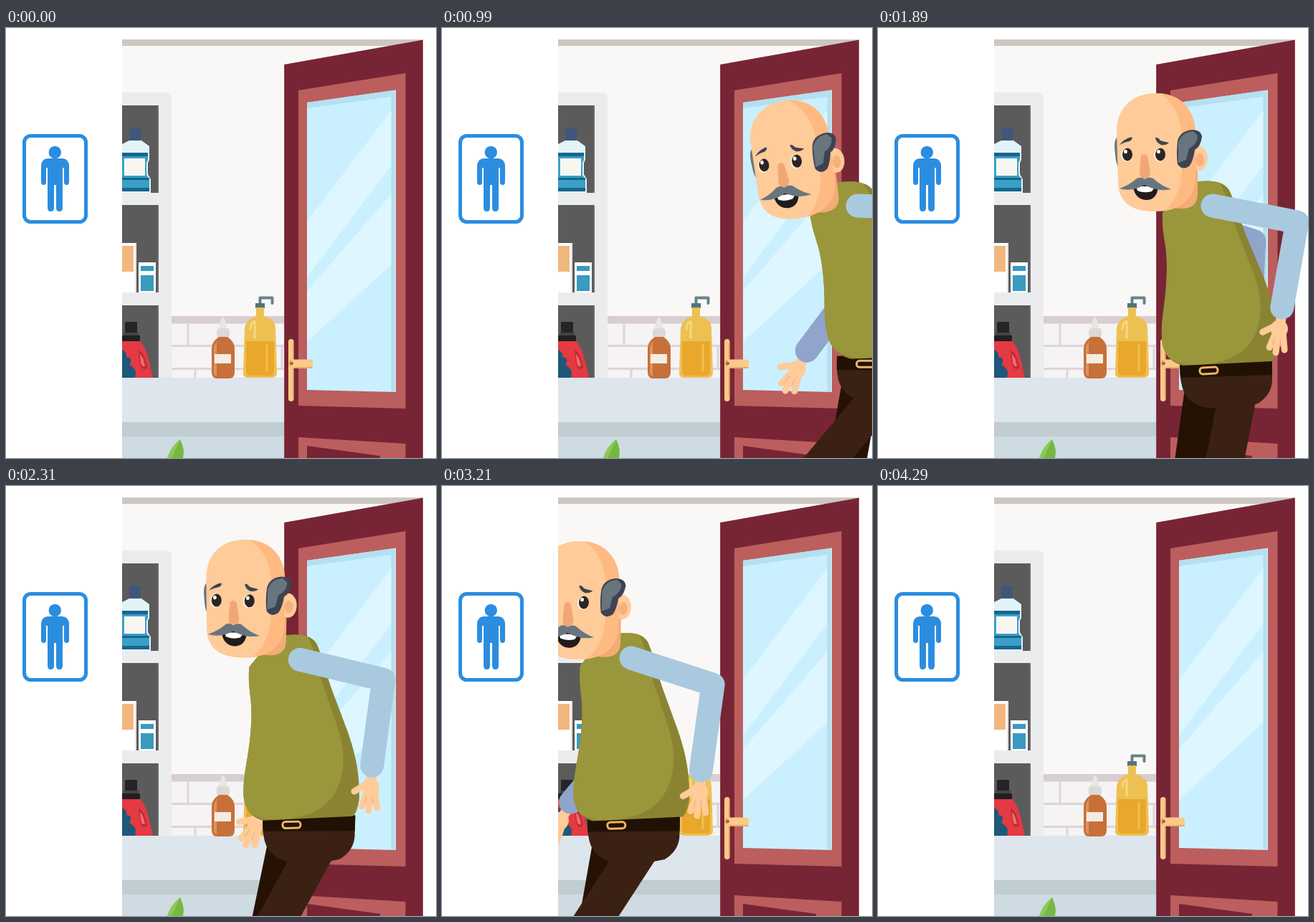
An HTML page with a canvas for the animation above (4.95 s loop, 600x600 px).

```html
<!DOCTYPE html>
<html lang="en">
<head>
<meta charset="utf-8">
<title>Washroom visit</title>
<style>
html, body { margin: 0; width: 100%; height: 100%; overflow: hidden; background: #fff; }
canvas { display: block; width: 600px; height: 600px; }
</style>
</head>
<body>
<canvas id="stage" width="600" height="600"></canvas>
<script>
const g = document.getElementById('stage').getContext('2d');
const LOOP = 4950, STEP = 30, EXIT = 4290;
const SKIN = '#fecb99', HAIR = '#69757e', INK = '#3d4353';
const SLEEVE = '#a9c9df', FAR_SLEEVE = '#90a4cc', PANTS = '#3a2114', FAR_PANTS = '#251204';

const fill = (color, d) => { g.fillStyle = color; g.fill(new Path2D(d)); };
const stroke = (color, width, d) => {
  g.strokeStyle = color; g.lineWidth = width;
  g.lineCap = g.lineJoin = 'round';
  g.stroke(new Path2D(d));
};
const box = (color, x, y, w, h, r = 0) => {
  g.fillStyle = color; g.beginPath(); g.roundRect(x, y, w, h, r); g.fill();
};
const oval = (color, x, y, rx, ry = rx) => {
  g.fillStyle = color; g.beginPath(); g.ellipse(x, y, rx, ry, 0, 0, 7); g.fill();
};
const group = draw => { g.save(); draw(); g.restore(); };
const rad = deg => deg * Math.PI / 180;

function drawSign() {
  const blue = '#2b8de0';
  g.strokeStyle = blue; g.lineWidth = 5;
  g.beginPath(); g.roundRect(25.5, 150.5, 86, 120, 9); g.stroke();
  oval(blue, 68.3, 173.5, 8.7);
  fill(blue, 'M58 182H79Q88 183 88 193V215Q88 219 84.5 219T81 215V195H79V251Q79 256 74.5 256T70 251V219H67V251Q67 256 62.5 256T58 251V195H56V215Q56 219 52.5 219T49 215V193Q49 183 58 182Z');
}

function drawRoom() {
  box('#f9f8f7', 162, 16, 420, 472);
  box('#ccc7c0', 162, 16, 420, 9);

  // tiles and counter
  box('#f5f3f4', 162, 402, 226, 86);
  box('#d8cdd0', 162, 402, 226, 10.5);
  stroke('#ded5d8', 3, 'M230 443.5H388M230 475.5H388M254 412V443M340 412V443M304 443V475M385 443V475M264 476V488M350 476V488');
  box('#dde5ed', 162, 488, 226, 62);
  box('#c0cdd2', 162, 550, 226, 20);
  box('#cfdbe3', 162, 570, 226, 30);
  fill('#77b843', 'M243 574Q230 584 225 600H247Q250 588 243 574Z');
  fill('#8dc95a', 'M243 574Q230 584 225 600H231Z');

  // shelf
  box('#ebecee', 162, 90, 69, 398, [0, 6, 0, 0]);
  for (const [y, h] of [[108, 122], [247, 122], [387, 101]]) {
    box('#5b5b5b', 162, y, 51, h);
    box('#6c6c6c', 211, y, 2, h);
  }
  drawMouthwash();
  box('#fff', 162, 300, 20, 69);
  box('#f1b77d', 162, 304, 16, 36);
  box('#ddd', 180, 302, 1.5, 67);
  box('#fff', 185, 327, 24, 42);
  box('#3a9abf', 188, 332, 18, 7);
  box('#3a9abf', 188, 345, 18, 22);
  drawDetergent();
  drawDropper();
  drawPump();
}

function drawMouthwash() {
  box('#40577a', 172, 139, 16, 20, 2);
  fill('#e3f3fa', 'M162 162L172 157H189L200 165V184L198 188V204L202 211V230H162Z');
  fill('#3b9fc6', 'M162 174H198V184L196 188V205L200 211V228H162Z');
  box('#17658d', 162, 174, 36, 5);
  box('#fff', 165, 182, 29, 24);
  box('#f7f7ef', 167, 184, 25, 20);
  box('#17658d', 162, 209, 38, 3);
  box('#17658d', 162, 223, 38, 5);
}

function drawDetergent() {
  box('#252525', 166, 410, 17, 16, 1);
  box('#444', 164, 425, 21, 5);
  box('#202020', 162, 429, 25, 8);
  fill('#e53943', 'M162 437H187Q195 445 199 462L205 488H162Z');
  fill('#b92c37', 'M185 450Q193 452 197 474Q190 480 187 468Z');
  fill('#f6696d', 'M187 455Q192 459 194 472Q190 474 188 467Z');
  fill('#1d5878', 'M162 449Q169 452 168 459Q178 460 172 470Q184 476 180 488H162Z');
}

function drawDropper() {
  fill('#e8e6e3', 'M301 404Q305 402 305.5 408L309 420V432H296V420Z');
  box('#dcdad6', 294, 419, 18, 13, 4);
  fill('#c77039', 'M297 431H309Q319 438 319 447V480Q319 489 311 489H295Q287 489 287 480V447Q287 438 297 431Z');
  fill('#dc935e', 'M296 436Q290 441 290 449V480Q290 485 294 486V440Z');
  box('#f4ede3', 291, 455, 23, 13);
}

function drawPump() {
  stroke('#66838c', 4, 'M354.5 386V376.5H371.5V384');
  box('#55737d', 348, 384, 13, 7);
  fill('#edc052', 'M349 390H360V402Q376 406 376 420L378 481Q378 488 370 488H338Q330 488 331 481L333 420Q334 407 349 402Z');
  fill('#e9a72b', 'M335 437H374V479Q374 485 369 485H340Q335 485 335 479Z');
  stroke('#f7d77e', 3, 'M341 420Q341 412 347 409V432');
  stroke('#f2c14f', 3, 'M364 442V478');
}

function drawDoor() {
  const wine = '#772534', rose = '#bc5e5e';
  fill(wine, 'M388 51L582 16.5V600H388Z');
  fill(rose, 'M408 87L557.5 63V531L408 527Z');
  fill('#caf0ff', 'M420 104L544 86.5V508L420 505Z');
  fill('#def6ff', 'M543 108V185L420 348V270ZM543 225V325L420 438V367Z');
  fill('#b5e0ef', 'M420 104L544 86.5V508H537.5V96L420 112Z');
  stroke('#d8f4fc', 1, 'M543.5 88V507');
  fill(rose, 'M408 571L557.5 580V600H408Z');
  fill(wine, 'M420 583L522 597V600H420Z');
  stroke('#95404c', 1, 'M388.5 52V600M581.5 18V600');
  box('#fbc989', 394, 434, 7.5, 87, 4);
  box('#e0a261', 400, 440, 1.5, 75, 1);
  oval('#d8914f', 400, 468, 5);
  box('#fbc989', 398, 462.5, 30, 12, 3);
  box('#e6ab68', 402, 473, 26, 2, 1);
  oval('#9c5b3b', 399, 468, 2);
}

/* time, head x y, chest x y, belly x, hip x y,
   near upper arm, far upper arm, near leg, far leg (offsets in px, angles in degrees) */
const POSES = [
  [0, 272, 14, 284, 4, 300, 292, -4, 5, 40, 10, 14],
  [540, 169, 13, 182, 2, 200, 195, -4, 4, 50, 6, 16],
  [720, 143, 2, 157, -6, 178, 172, -12, 3, 66, 28, 10],
  [990, 101, 10, 113, 0, 142, 130, -8, 2, 70, 40, 10],
  [1300, 67, 20, 78, 8, 95, 88, 4, 6, 32, 22, 10],
  [1620, 32, 15, 36, 5, 40, 38, 3, 9, 18, 14, 9],
  [1890, 0, 0, 0, 0, 0, 0, 0, 11, 18, 11, 8],
  [2200, -36, -18, -38, -7, -44, -43, -6, 13, 68, 32, 10],
  [2700, -129, -4, -133, 3, -147, -141, 6, 15, 18, 5, 19],
  [3210, -196, -14, -203, -8, -213, -218, -4, 18, 75, 33, 10],
  [3810, -330, 8, -325, 12, -294, -301, 13, 30, 18, 32, 12],
  [4290, -450, 0, -442, 5, -402, -418, 0, 20, 60, 20, 12],
];

// cubic through the poses, with slopes that never overshoot
function slope(i, c) {
  const p = POSES[i - 1], q = POSES[i], r = POSES[i + 1];
  if (!p || !r) return p ? (q[c] - p[c]) / (q[0] - p[0]) : (r[c] - q[c]) / (r[0] - q[0]);
  const u = (q[c] - p[c]) / (q[0] - p[0]), v = (r[c] - q[c]) / (r[0] - q[0]);
  return u * v <= 0 ? 0 : 2 * u * v / (u + v);
}
function poseAt(t) {
  let i = 0;
  while (i < POSES.length - 2 && t >= POSES[i + 1][0]) i++;
  const p = POSES[i], q = POSES[i + 1], d = q[0] - p[0], s = (t - p[0]) / d;
  return p.map((v, c) => {
    const m = slope(i, c) * d, n = slope(i + 1, c) * d;
    return v + s * (m + s * (3 * (q[c] - v) - 2 * m - n + s * (m + n - 2 * (q[c] - v))));
  });
}

function drawHand(x, y, turn) {
  group(() => {
    g.translate(x, y);
    g.rotate(rad(turn));
    stroke(SKIN, 14, 'M0 8L-2 24');
    stroke(SKIN, 9, 'M-6 24L-26 35M-6 30L-16 56M-4 32L-7 63M2 32L5 59');
    oval(SKIN, -3, 30, 12, 13);
    stroke('#efb07d', 1.2, 'M-9 42L-12 52M-1 43L-1 54');
  });
}

function drawArm(color, x, y, upper, lower, len1, len2, turn) {
  const ex = x + len1 * Math.cos(rad(upper)), ey = y + len1 * Math.sin(rad(upper));
  const wx = ex - len2 * Math.sin(rad(lower)), wy = ey + len2 * Math.cos(rad(lower));
  drawHand(wx, wy, turn);
  stroke(color, 33, `M${x} ${y}L${ex} ${ey}L${wx} ${wy}`);
}

function drawLeg(color, x, angle) {
  const dx = Math.sin(rad(angle)) * 200, dy = Math.cos(rad(angle)) * 200;
  stroke(color, 53, `M${x} 502L${x - dx} ${502 + dy}`);
}

function drawTorso() {
  const shape = 'M430 216C460 212 480 211 490 226C499 245 505 267 513 288L539 350C551 382 557 405 558 440C557 455 553 463 550 465L425 471C405 466 396 450 396 430C395 400 403 380 403 330C403 300 396 290 397 258Z';
  fill('#8a8432', shape);
  group(() => {
    g.clip(new Path2D(shape));
    fill('#9a963b', 'M380 205H466C480 215 486 232 493 262L523 340C535 372 538 400 526 428C512 458 480 470 440 470C420 470 402 462 392 445Z');
  });
}

function drawHead() {
  const face = 'M333 145C333 112 354 91 388 91C422 91 443 114 443 148V208C443 238 422 256 386 256C352 256 335 242 335 214Z';
  fill('#f3ab78', 'M405 200L446 195V232Q446 251 425 252L396 250Z');
  fill(HAIR, 'M335 152Q328 154 331 176Q332 192 337 196Z');
  oval(SKIN, 448, 182, 12, 17);
  oval('#f6b27e', 449, 184, 6, 9);
  fill(SKIN, face);
  group(() => {
    g.clip(new Path2D(face));
    fill('#ffba82', 'M388 88C408 98 424 122 424 152V196Q424 236 396 258H450V88Z');
  });
  fill(INK, 'M418 158Q421 144 438 142Q451 142 452 152Q450 166 442 170Q440 184 435 192Q425 200 418 190Q416 175 418 158Z');
  fill(HAIR, 'M419 160Q424 145 440 144L446 150Q446 162 434 168L430 184L419 188Z');

  for (const x of [348, 394]) {
    oval('#fff1dc', x - 1, 177, 8, 10);
    oval('#2c2523', x, 176.5, 7, 9);
    oval('#fff', x - 2.5, 172.5, 2.4, 2.8);
  }
  fill(INK, 'M337 163Q344 154 354 152Q356 155 351 158Q344 159 337 163ZM387 153Q390 152 394 157Q400 159 406 160Q402 164 395 163Q388 160 387 153Z');
  fill('#f1a775', 'M367 178Q372 174 376 179L380 202Q379 210 372 210T365 202Z');
  fill('#211b1b', 'M356 222Q374 215 391 222Q389 240 374 240Q359 239 356 222Z');
  fill('#fff', 'M360 221H387L382 228Q371 231 362 227Z');
  fill(HAIR, 'M337 224Q351 219 361 210Q367 207 372 211Q378 207 384 210Q395 220 409 225Q390 229 372 219Q354 229 337 224Z');
}

function drawMan(t) {
  const [, hx, hy, ax, ay, bx, px, py, upper, farUpper, leg, farLeg] = poseAt(t);
  const lower = 10 + py * 0.5, farLower = 3 + (farUpper - 18) * 0.65;
  const span = 205, top = 235;

  drawArm(FAR_SLEEVE, 425 + ax, 265 + ay, farUpper, farLower, 105, 108, farLower * 0.6);

  group(() => {
    g.translate(px, py);
    drawLeg(FAR_PANTS, 455, farLeg);
    drawLeg(PANTS, 506 - leg * 0.2, leg);
    g.translate(485, 468);
    g.rotate(rad(-py * 0.35));
    g.translate(-485, -468);
    fill(PANTS, 'M421 470L550 463V492Q549 512 530 524Q500 532 462 530Q438 528 427 508Q421 495 421 470Z');
    fill('#211104', 'M421 469L550 462V484L422 488Z');
    g.translate(461.5, 478);
    g.rotate(rad(-3));
    g.strokeStyle = '#edb465'; g.lineWidth = 3;
    g.beginPath(); g.roundRect(-12.5, -4.5, 25, 9, 4); g.stroke();
  });

  group(() => {
    const kx = (bx - ax) / span, ky = (py - ay) / span;
    g.transform(1, 0, kx, 1 + ky, ax - kx * top, ay - ky * top);
    drawTorso();
  });

  group(() => {
    g.translate(388 + hx, 175 + hy);
    g.rotate(rad(Math.max(-7, Math.min(1, (t - 1890) / 130))));
    g.translate(-388, -175);
    drawHead();
  });

  drawArm(SLEEVE, 467 + ax, 248 + ay, upper, lower, 120, 121, (lower - 9) * 1.6);
}

function render(now) {
  const t = Math.floor(now % LOOP / STEP) * STEP;
  g.fillStyle = '#fff';
  g.fillRect(0, 0, 600, 600);
  drawSign();
  drawRoom();
  drawDoor();
  if (t > 0 && t < EXIT) group(() => {
    g.beginPath();
    g.rect(162, 0, 438, 600);
    g.clip();
    drawMan(t);
  });
}

let start;
function tick(now) {
  start ??= now;
  render(now - start);
  requestAnimationFrame(tick);
}
render(0);
requestAnimationFrame(tick);
</script>
</body>
</html>
```
